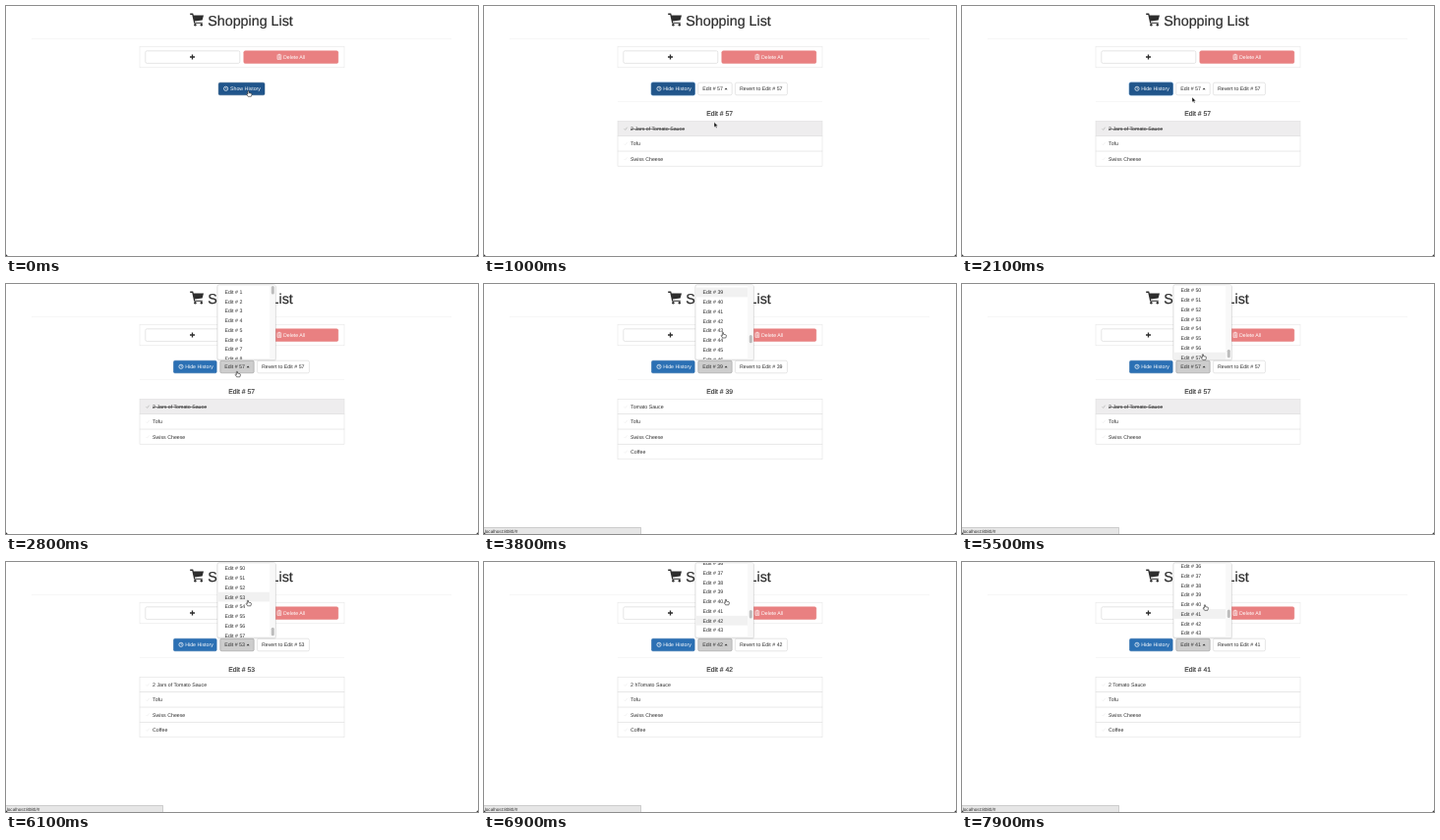
Animation, 480 px wide and 255 px high, one loop 8000 ms. Source, as an HTML page:

```html
<!DOCTYPE html>
<html lang="en">
<head>
<meta charset="utf-8">
<title>Shopping List</title>
<style>
  html, body { margin: 0; width: 100%; height: 100%; overflow: hidden; background: #fff; }
  svg { display: block; width: 100vw; height: 100vh; }
  text {
    font: 5.25px "Liberation Sans", Arial, Helvetica, sans-serif;
    fill: #2d2d2d; white-space: pre; text-rendering: geometricPrecision;
  }
  .title { font-size: 14.3px; stroke: #2d2d2d; stroke-width: .2px; }
  .heading { font-size: 6.8px; text-anchor: middle; stroke: #2d2d2d; stroke-width: .12px; }
  .light { fill: #fff; }
  .status { font-size: 4.6px; }
  .done { text-decoration: line-through; }
</style>
</head>
<body>
<svg id="stage" viewBox="0 0 480 255"></svg>
<script>
const LOOP = 8000, STEP = 100;
const OPEN_HISTORY = 400, BLUR = 2200, OPEN_MENU = 2300;
const ITEM_H = 9.75, ITEM_TOP = 3.1, ROW_H = 15.35, LIST_Y = 117.4, EDITS = 57, MAX_SCROLL = 485;
const NAMES = ["Tomato Sauce", "Tofu", "Swiss Cheese", "Coffee"];

// [time, x, y] of the pointer tip
const POINTER = [
  [0, 246.5, 86.5], [300, 247, 87], [500, 247, 88.5], [700, 243, 100], [900, 236, 116],
  [1000, 234, 118.5], [1800, 233.5, 105], [2100, 234, 93], [2300, 235, 88], [2600, 235, 89],
  [2800, 235, 89], [2900, 236, 80], [3000, 238, 62], [3200, 240, 48], [4200, 245, 50],
  [4400, 247, 52], [4500, 248, 40], [4600, 248, 35], [4800, 247, 38], [5000, 246, 52],
  [5200, 245.5, 66], [5300, 245, 71.5], [5500, 245, 71.5], [5700, 245, 62], [5900, 246, 45],
  [6000, 245.5, 39.5], [6100, 246, 39], [6800, 246, 38], [7100, 246, 38], [7300, 246, 34],
  [7600, 247, 52], [7800, 247, 52], [7900, 247, 43.5]
];
// [time, offset] of the menu
const SCROLL = [
  [3000, 0], [3100, 15], [3400, 150], [3700, 330], [4000, 450], [4200, 479.4],
  [6250, 479.4], [6400, 470], [6600, 430], [6800, 369], [6900, 348], [7000, 345]
];

function at(table, t, col = 1) {
  const i = table.findIndex(k => k[0] > t);
  if (i < 0) return table[table.length - 1][col];
  if (i === 0) return table[0][col];
  const a = table[i - 1], b = table[i];
  return a[col] + (b[col] - a[col]) * (t - a[0]) / (b[0] - a[0]);
}

function el(parent, tag, attrs = {}, content) {
  const node = document.createElementNS("http://www.w3.org/2000/svg", tag);
  set(node, attrs);
  if (content !== undefined) node.textContent = content;
  return parent.appendChild(node);
}
function set(node, attrs) {
  for (const k in attrs) node.setAttribute(k, attrs[k]);
}
const show = (node, on) => set(node, { display: on ? "inline" : "none" });
const group = (parent, attrs) => el(parent, "g", attrs);
const label = (parent, x, y, str, cls = "") => el(parent, "text", { x, y, class: cls }, str);
const path = (parent, d, attrs) => el(parent, "path", { d, ...attrs });
const rect = (parent, x, y, width, height, attrs) => el(parent, "rect", { x, y, width, height, ...attrs });
const rule = (parent, x1, x2, y, stroke) =>
  path(parent, `M${x1} ${y}H${x2}`, { stroke, "stroke-width": .5 });
const button = (parent, x, y, w, fill, stroke) =>
  rect(parent, x, y, w, 12.6, { rx: 1.5, fill, stroke, "stroke-width": .5 });

function clock(parent, x, y) {
  el(parent, "circle", { cx: x, cy: y, r: 2.1, fill: "none", stroke: "#fff", "stroke-width": .7 });
  path(parent, `M${x} ${y - 1.2}V${y}H${x + 1}`, { fill: "none", stroke: "#fff", "stroke-width": .5 });
}

const stage = document.getElementById("stage");
rect(stage, 0, 0, 480, 255, { fill: "#fff" });

// Page header
const cart = group(stage, { fill: "#2d2d2d" });
path(cart, "M187.2 7.6H190.2L190.8 9.5H201L199.6 14.6L191.9 15.6L192.2 16.8H199.8V17.8H191.2L189.3 8.9H187.2Z");
el(cart, "circle", { cx: 192.4, cy: 19.3, r: 1.2 });
el(cart, "circle", { cx: 198.8, cy: 19.3, r: 1.2 });
label(stage, 205.2, 20.4, "Shopping List", "title");
rule(stage, 26, 453, 33.5, "#ececec");

// Toolbar
rect(stage, 136, 41.4, 208, 21.4, { fill: "#fff", stroke: "#e2e2e2", "stroke-width": .5 });
button(stage, 141.8, 45.8, 96, "#fff", "#ccc");
path(stage, "M187 52H192M189.5 49.5V54.5", { stroke: "#2d2d2d", "stroke-width": 1.3 });
button(stage, 241.8, 45.8, 96, "#e98081", "#e57a7a");
path(stage, "M275.5 50.2H280.3M277 50V49.3H278.8V50M276 50.8V54.4H279.8V50.8M277.2 51.2V53.8M278.5 51.2V53.8",
  { fill: "none", stroke: "#fff", "stroke-width": .6 });
label(stage, 282, 54, "Delete All", "light");

// Collapsed history
const closed = group(stage);
button(closed, 216.2, 78.2, 46.8, "#20558b", "#1b4876");
clock(closed, 223.6, 84.3);
label(closed, 228, 86.3, "Show History", "light");

// Expanded history
const history = group(stage);
const ring = rect(history, 169.6, 77.5, 45.4, 14, { rx: 2, fill: "#8fc0ee" });
const hideBtn = button(history, 170.4, 78.2, 43.8, "", "");
clock(history, 178, 84.3);
label(history, 182.2, 86.3, "Hide History", "light");
const editBtn = button(history, 217.8, 78.2, 34.4, "", "");
const editText = label(history, 222.2, 86.3, "");
path(history, "M244.6 85.2H247.6L246.1 83.6Z", { fill: "#2d2d2d" });
button(history, 255.4, 78.2, 53, "#fff", "#ccc");
const revertText = label(history, 260, 86.3, "");
rule(history, 136, 344, 97.4, "#ececec");
const heading = label(history, 239.6, 112.1, "", "heading");

const rows = NAMES.map((_, i) => {
  const y = LIST_Y + i * ROW_H;
  const g = group(history);
  const box = rect(g, 136, y, 208, ROW_H, { stroke: "#dcdcdc", "stroke-width": .5 });
  const tick = path(g, `M142.5 ${y + 7.9}L143.6 ${y + 9}L145.6 ${y + 6.3}`, { fill: "none", "stroke-width": .6 });
  return { g, box, tick, text: label(g, 149, y + 9.5, "") };
});

// Dropdown menu
const menu = group(stage);
rect(menu, 214.6, 1.4, 60.4, 77, { rx: 2, fill: "#000", opacity: .08 });
rect(menu, 215, .8, 59, 76.4, { rx: 1.5, fill: "#fff", stroke: "#c4c4c4", "stroke-width": .5 });
const clip = el(el(stage, "defs"), "clipPath", { id: "view" });
rect(clip, 215.2, 1, 58.6, 76);
const view = group(menu, { "clip-path": "url(#view)" });
const list = group(view);
const glow = rect(list, 215.2, 0, 53, ITEM_H, { fill: "#f1f1f1" });
for (let n = 1; n <= EDITS; n++) label(list, 222.5, n * ITEM_H + .2, "Edit # " + n);
rect(view, 268.2, 1, 5.6, 76, { fill: "#f8f8f8" });
const thumb = rect(view, 269.8, 0, 3, 8.4, { rx: 1.5, fill: "#bdbdbd" });

// Link address
const status = group(stage);
rect(status, -1, 248.2, 160.4, 8, { fill: "#e6e6e6", stroke: "#a8a8a8", "stroke-width": .5 });
label(status, .8, 253.5, "localhost:8080/#", "status");

// Window corners
path(stage, "M0 253V255H2Q.4 254.6 0 253ZM480 253V255H478Q479.6 254.6 480 253Z", { fill: "#222" });

// Pointers, tip at the origin
const pointer = group(stage, { "stroke-linejoin": "round" });
const arrow = path(pointer, "M0 0V5.2L1.2 4.1L2.1 6L3 5.6L2.2 3.8H3.8Z",
  { fill: "#111", stroke: "#fff", "stroke-width": .4 });
const hand = path(pointer,
  "M-.6 .4Q0 -.3 .5 .4V2.1L3.1 2.7Q3.6 3 3.4 4L2.8 5.8H-.3L-2 3.5Q-1.7 2.7-.6 3.6Z",
  { fill: "#fff", stroke: "#222", "stroke-width": .6 });

// The list as it stood after edit n: first typed letter by letter, then amended
function snapshot(n) {
  const items = [];
  let left = Math.min(n, 39) - 1;
  for (const name of NAMES) {
    if (left <= 0) break;
    items.push(name.slice(0, left - 1));
    left -= name.length + 1;
  }
  if (n >= 40) {
    const extra = n === 40 ? "2" : n === 42 ? "2 h" : "2 " + "Jars of ".slice(0, Math.max(0, n - 43));
    items[0] = extra + items[0];
  }
  if (n === EDITS) items.pop();
  return items.map((text, i) => ({ text, done: i === 0 ? n >= 54 : i === 1 && n === 55 }));
}

// The highlight trails the pointer by one step
function hoveredEdit(t) {
  const y = at(POINTER, t - STEP, 2);
  if (t < OPEN_MENU + STEP || y > 77) return 0;
  const n = Math.floor((y + at(SCROLL, t - STEP) - ITEM_TOP) / ITEM_H) + 1;
  return Math.min(EDITS, Math.max(1, n));
}

function draw(t) {
  const x = at(POINTER, t, 1), y = at(POINTER, t, 2), scroll = at(SCROLL, t);
  const expanded = t >= OPEN_HISTORY, open = t >= OPEN_MENU, focused = t < BLUR;
  const clickable = y < 91.5;
  const hover = hoveredEdit(t), edit = hover || EDITS;

  show(closed, !expanded);
  show(history, expanded);
  show(ring, focused);
  set(hideBtn, focused ? { fill: "#20558b", stroke: "#173d66" } : { fill: "#2b70b4", stroke: "#2665a4" });
  set(editBtn, open ? { fill: "#cdcdcd", stroke: "#8f8f8f" }
    : clickable ? { fill: "#e4e4e4", stroke: "#adadad" } : { fill: "#fff", stroke: "#ccc" });

  const name = "Edit # " + edit;
  editText.textContent = heading.textContent = name;
  revertText.textContent = "Revert to " + name;
  const items = snapshot(edit);
  rows.forEach((row, i) => {
    const item = items[i];
    show(row.g, !!item);
    if (!item) return;
    row.text.textContent = item.text;
    set(row.text, { class: item.done ? "done" : "" });
    set(row.box, { fill: item.done ? "#eeedee" : "#fff" });
    set(row.tick, { stroke: item.done ? "#a5a5a5" : "#ebebeb" });
  });

  show(menu, open);
  set(list, { transform: `translate(0 ${-scroll})` });
  show(glow, hover > 0);
  set(glow, { y: ITEM_TOP + (edit - 1) * ITEM_H });
  set(thumb, { y: 2 + scroll / MAX_SCROLL * 65.5 });
  show(status, hover > 0);

  set(pointer, { transform: `translate(${x} ${y})` });
  show(hand, clickable);
  show(arrow, !clickable);
}

const start = performance.now();
function tick() {
  const t = (performance.now() - start) % LOOP;
  draw(Math.floor(t / STEP) * STEP);
  requestAnimationFrame(tick);
}
tick();
</script>
</body>
</html>
```
